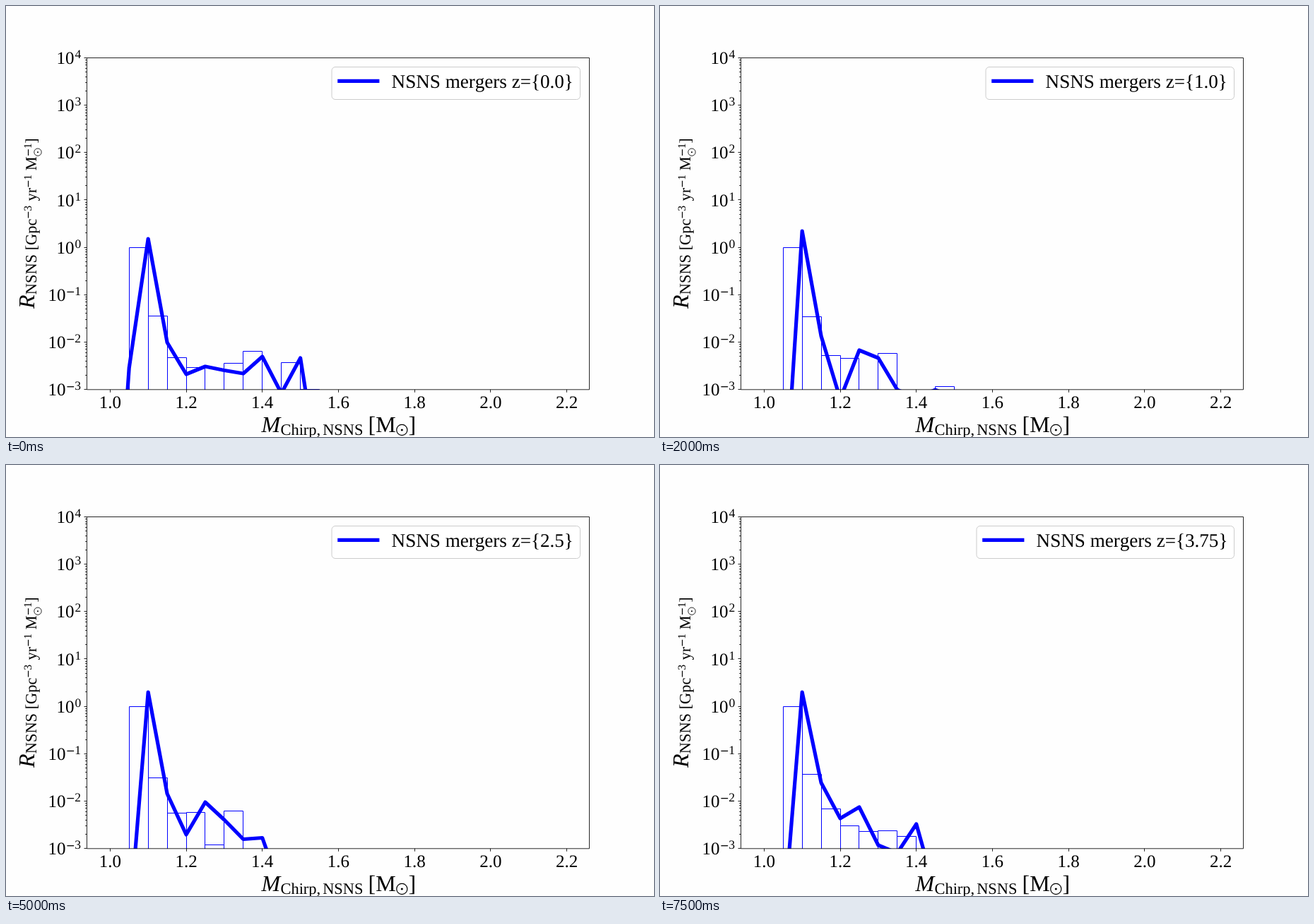
Recreate the animation shown at these times as an HTML page. Size 917 px wide and 611 px high, loop 8000 ms.

```html
<!DOCTYPE html>
<html lang="en">
<head>
<meta charset="utf-8">
<title>NSNS merger rate by chirp mass</title>
<style>
  html, body { margin: 0; width: 100%; height: 100%; overflow: hidden; background: #fefefe; }
  svg { display: block; }
  text {
    font-family: "Liberation Serif", "Times New Roman", serif;
    font-kerning: none;
    text-rendering: geometricPrecision;
    white-space: pre;
  }
  .axis { fill: none; stroke: #000; stroke-width: .85; }
  .bar { fill: none; stroke: #00f; stroke-width: 1; }
  .curve { fill: none; stroke: #00f; stroke-width: 5.2; stroke-linejoin: round; stroke-linecap: square; }
  .box { fill: #fff; fill-opacity: .8; stroke: #ccc; stroke-width: 1; }
  .ring { fill: none; stroke: #000; }
  .it { font-style: italic; }
</style>
</head>
<body>
<svg id="stage" width="917" height="611" viewBox="0 0 917 611">
  <clipPath id="plot"><rect x="114.5" y="73.5" width="711" height="470.5"/></clipPath>
  <g clip-path="url(#plot)">
    <path id="bars" class="bar"/>
    <path id="curve" class="curve"/>
  </g>
</svg>
<script>
const stage = document.getElementById("stage");
const STEP = 500, STEPS = 16;
const FLOOR = 543.5, DECADE = 67.15;
const xAt = mass => 147.3 + (mass - 1) * 538.6;
const yAt = power => 342.1 - power * DECADE;

function add(parent, tag, attrs, content = "") {
  const el = document.createElementNS("http://www.w3.org/2000/svg", tag);
  for (const k in attrs) el.setAttribute(k, attrs[k]);
  el.textContent = content;
  parent.appendChild(el);
  return el;
}
const label = (parent, x, y, size, content, extra) =>
  add(parent, "text", { x, y, "font-size": size, ...extra }, content);

// Exponent with a wide math minus
function exponent(parent, x, y, size, n) {
  if (n < 0) {
    add(parent, "rect", { x: x + size * .064, y: y - size * .29, width: size * .557, height: size * .075 });
    x += size * .685;
  }
  label(parent, x, y, size, Math.abs(n));
}

function sun(parent, cx, cy, r) {
  add(parent, "circle", { cx, cy, r, class: "ring", "stroke-width": r * .16 });
  add(parent, "circle", { cx, cy, r: r * .2 });
}

function drawAxes() {
  let d = "M114.5 73.5H825.5V543.8H114.5Z";
  const yTick = (y, len) => { d += `M114.5 ${Math.floor(y) + .5}h${-len}`; };
  for (let p = -3; p <= 4; p++) {
    const y = yAt(p), neg = p < 0;
    yTick(y, 4);
    label(stage, neg ? 59.5 : 71.5, y + 8.6, 25, "10");
    exponent(stage, neg ? 85.3 : 97.5, y + .6, 17.5, p);
    for (let k = 2; k < 10 && p < 4; k++) yTick(yAt(p + Math.log10(k)), 2.3);
  }
  for (let i = 0; i < 7; i++) {
    const mass = 1 + i * .2, x = xAt(mass);
    d += `M${Math.floor(x) + .5} 543.8v4`;
    label(stage, x, 570, 25, mass.toFixed(1), { "text-anchor": "middle" });
  }
  add(stage, "path", { d, class: "axis" });
}

function drawTitles() {
  label(stage, 361.5, 604, 32, "M", { class: "it" });
  label(stage, 388.5, 607.5, 22.4, "Chirp,");
  label(stage, 448.2, 607.5, 22.4, "NSNS");
  label(stage, 512.5, 604, 32, "[M");
  sun(stage, 560.3, 601, 7.6);
  label(stage, 569.5, 604, 32, "]");

  const g = add(stage, "g", { transform: "translate(0 429) rotate(-90)" });
  label(g, 0, 39.5, 32, "R", { class: "it" });
  label(g, 19.8, 43, 22.4, "NSNS [Gpc");
  exponent(g, 127.5, 35.5, 15.7, -3);
  label(g, 152.5, 43, 22.4, "yr");
  exponent(g, 171.5, 35.5, 15.7, -1);
  label(g, 195.8, 43, 22.4, "M");
  exponent(g, 216, 35.5, 15.7, -1);
  sun(g, 221.8, 45, 5.2);
  label(g, 234.3, 43, 22.4, "]");
}

drawAxes();
drawTitles();
const box = add(stage, "rect", { y: 86.5, height: 46, rx: 5, class: "box" });
const sample = add(stage, "path", { class: "curve" });
const legend = label(stage, 0, 116, 27.1, "");

// Heights in pixels at the key steps; missing entries lie below the floor
const keySteps = [0, 2, 4, 8, 10, 12, 15];
const curveKeys = [
  [513, 330, 477, 522, 511, 516.5, 521, 497, 549, 499],
  [531, 329, 464, 527.5, 503.5, 509, 528, 503, 522, 510],
  [733, 319, 468, 557, 488, 499, 544, 556, 544, 556],
  [674, 321.5, 471, 537, 478.5, 497, 532, 540.5],
  [654, 322, 466, 524, 478, 503, 530.5, 528.5],
  [654, 322, 458.5, 514, 480, 513.5, 534.5, 518.5],
  [654, 322, 450.5, 501, 485, 539, 550, 509]
];
const barKeys = [
  [439.5, 498, 512, 560, 506, 489, 560, 505, 543.5],
  [439.5, 492, 510, 560, 499, 506, 560, 493.5],
  [440.5, 495.5, 499.5, 560, 492.5, 560, 560, 539],
  [444.5, 492.5, 489.5, 548, 488],
  [443, 493.5, 492, 538, 490.5, 548],
  [440.5, 493.5, 499.5, 529, 499, 536.5],
  [438.5, 487.5, 511, 519.5, 518, 526.5]
];

function blend(keys, step, count, hidden) {
  let i = 0;
  while (i < keySteps.length - 2 && step >= keySteps[i + 1]) i++;
  const f = (step - keySteps[i]) / (keySteps[i + 1] - keySteps[i]);
  return Array.from({ length: count }, (_, n) => {
    const a = keys[i][n] ?? hidden, b = keys[i + 1][n] ?? hidden;
    return a + (b - a) * f;
  });
}

function render(step) {
  const ys = [900, ...blend(curveKeys, step, 10, 605), 670];
  document.getElementById("curve").setAttribute("d",
    "M" + ys.map((y, i) => `${xAt(1 + i * .05)} ${y}`).join("L"));

  const edge = i => Math.floor(xAt(1.05 + i * .05)) + .5;
  const tops = [342.5, ...blend(barKeys, step, 9, 560)];
  document.getElementById("bars").setAttribute("d", tops.map((y, i) =>
    y > FLOOR ? "" : `M${edge(i)} 550V${Math.floor(y) + .5}H${edge(i + 1)}V550`).join(""));

  const z = step / 4, wide = step % 2;
  const left = wide ? 448 : 461;
  box.setAttribute("x", left);
  box.setAttribute("width", 812.5 - left);
  sample.setAttribute("d", `M${left + 10.8} 106.3h54`);
  legend.setAttribute("x", left + 84.6);
  legend.textContent = `NSNS mergers z={${z.toFixed(wide ? 2 : 1)}}`;
}

let shown = -1;
function tick() {
  const step = Math.floor(performance.now() / STEP) % STEPS;
  if (step !== shown) render(shown = step);
  requestAnimationFrame(tick);
}
tick();
</script>
</body>
</html>
```
